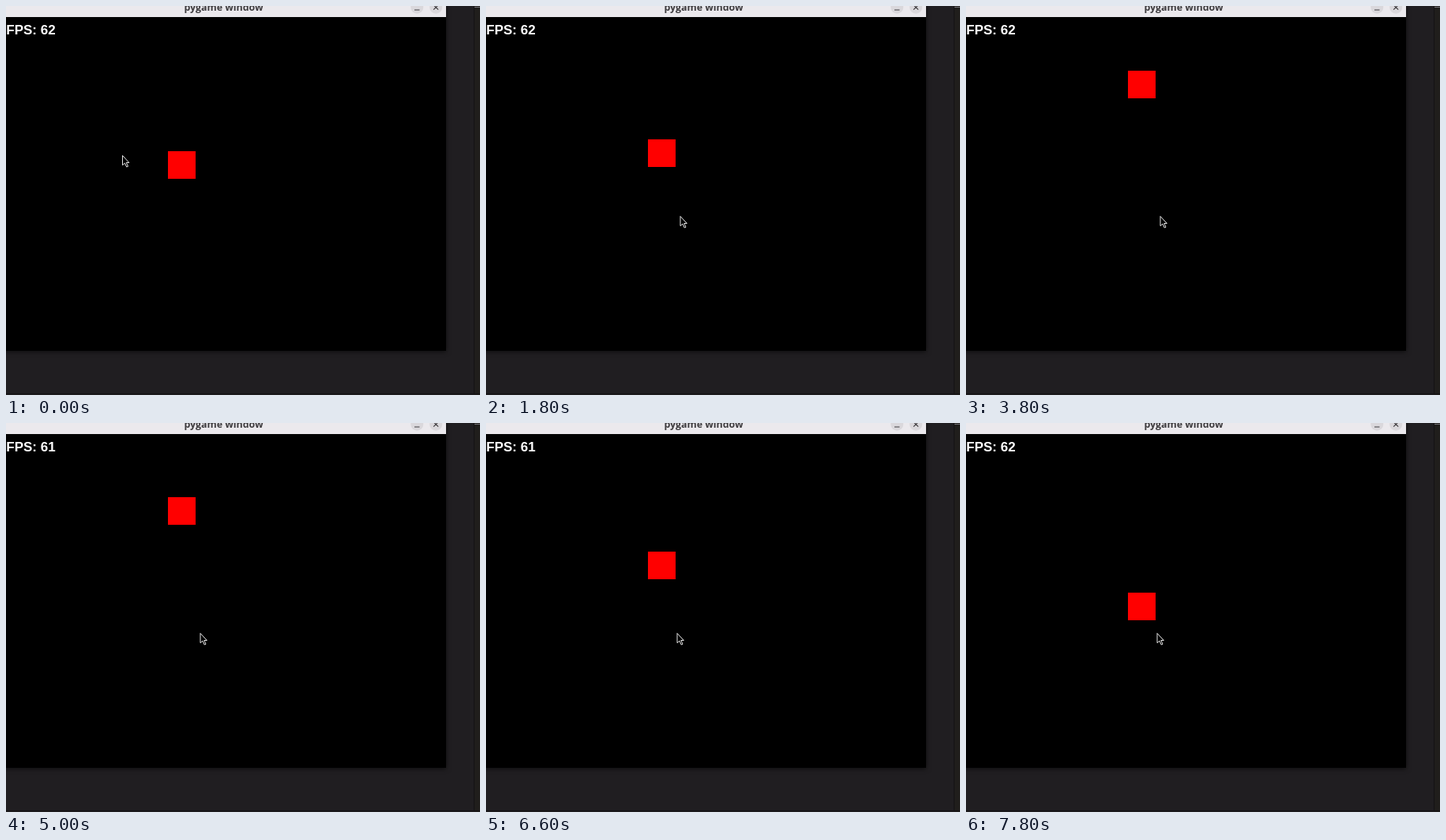
An HTML page for the animation above (8000 ms loop, 600x493 px).

```html
<!DOCTYPE html>
<html lang="en">
<head>
<meta charset="utf-8">
<title>Bouncing square</title>
<style>
  html, body { margin: 0; width: 100%; height: 100%; overflow: hidden; background: #201e21; }
  svg { display: block; width: 600px; height: 493px; }
  .title { font: bold 12.4px "Open Sans", "Noto Sans", sans-serif; fill: #3d3b3e; text-anchor: middle; }
  .fps { font: bold 17px "Liberation Sans", Arial, sans-serif; fill: #fff; white-space: pre; }
  .window { filter: drop-shadow(0 1px 3px rgba(0, 0, 0, .65)); }
</style>
</head>
<body>
<svg viewBox="0 0 600 493">
  <rect width="600" height="493" fill="#201e21"/>
  <rect x="593" width="7" height="493" fill="#201e1c"/>
  <path d="M592.5 0V491M0 491.5H600" stroke="#141214"/>
  <path d="M593 1.5H600" stroke="#77757a"/>

  <g class="window">
    <rect x="-20" y="-20" width="577" height="457" fill="#000"/>
    <rect x="-20" y="-20" width="577" height="34" fill="#ebe9ed"/>
  </g>
  <text class="title" x="275.5" y="6">pygame window</text>
  <g fill="#dad8dc">
    <circle cx="520.3" cy="1.7" r="8"/>
    <circle cx="544.2" cy="1.7" r="8"/>
  </g>
  <path d="M517 5h6.5M541.2-1.3l6 6m0-6l-6 6" stroke="#3d3b3e" stroke-width="1.2" fill="none"/>

  <text class="fps" id="fps" x=".3" y="36">FPS: 62</text>
  <rect id="square" x="205" width="35" height="35" fill="#f00"/>
  <path id="cursor" d="M0 0V12.2L2.9 9.7L5.2 14.5L7 13.7L4.8 9H8.3Z" fill="#000" stroke="#fff" stroke-width=".9"/>
</svg>
<script>
  const LOOP = 8000, STEP = 200;
  const TOP = 62, BOTTOM = 215.6, SPEED = 0.0434, TOP_TIME = 4265;
  const SWEEP = 1350;

  const clamp = v => Math.min(1, Math.max(0, v));
  const smooth = v => v * v * (3 - 2 * v);
  const bezier = (a, b, c, u) => (1 - u) ** 2 * a + 2 * u * (1 - u) * b + u * u * c;

  // Constant speed, reflected at the lower turning point.
  function squareY(t) {
    const y = TOP + SPEED * Math.abs(t - TOP_TIME);
    return Math.round(BOTTOM - Math.abs(BOTTOM - y));
  }

  // One curved sweep, then a small drift to the left.
  function cursorAt(t) {
    const u = clamp(t / SWEEP);
    const drift = 4 * smooth(clamp((t - 5200) / 1300));
    return [bezier(147.5, 180, 246, u) - drift, bezier(189.5, 425, 266.5, u)];
  }

  const fpsAt = t => Math.round(61.5 + 0.49 * Math.cos(2 * Math.PI * t / 2000));

  const square = document.getElementById("square");
  const cursor = document.getElementById("cursor");
  const fps = document.getElementById("fps");

  function draw(now) {
    const t = Math.floor((now % LOOP) / STEP) * STEP;
    square.setAttribute("y", squareY(t));
    cursor.setAttribute("transform", `translate(${cursorAt(t)})`);
    fps.textContent = "FPS: " + fpsAt(t);
  }

  const start = performance.now();
  function tick() {
    draw(performance.now() - start);
    requestAnimationFrame(tick);
  }
  tick();
</script>
</body>
</html>
```
